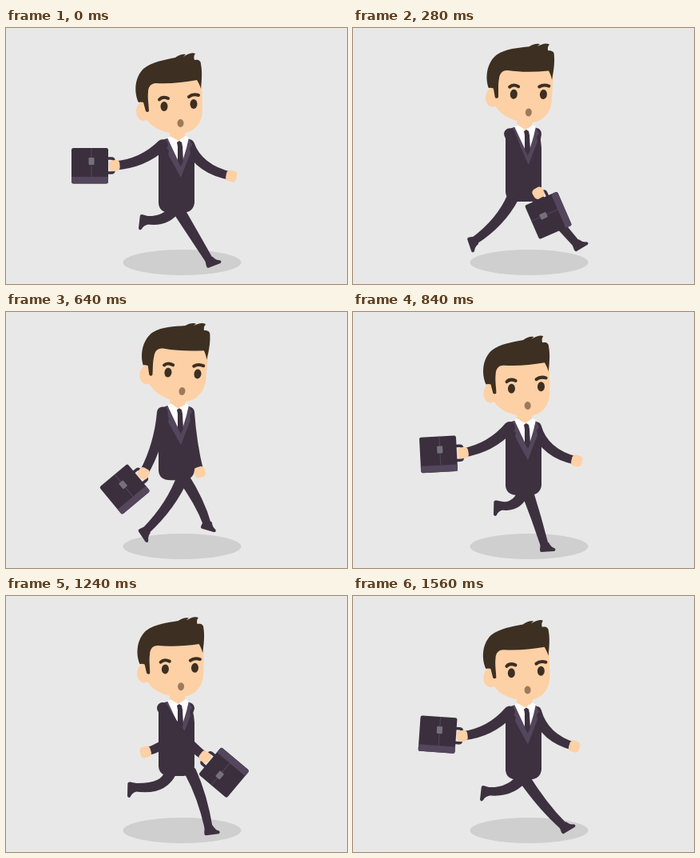
Recreate the animation shown at these times as an HTML page. Size 427 by 320 pixels, loop 1.6 s.

```html
<!DOCTYPE html>
<html lang="en">
<head>
<meta charset="utf-8">
<title>Running businessman</title>
<style>
  html, body { margin: 0; width: 100%; height: 100%; overflow: hidden; background: #e8e8e8; }
  svg { display: block; width: 100vw; height: 100vh; }
  .suit { fill: #3d3140; }
  .skin { fill: #fdd0a5; }
  .hair { fill: #3d2f22; }
  .trim { fill: #54465c; }
  .brow { fill: none; stroke: #3d2f22; stroke-width: 4; stroke-linecap: round; }
</style>
</head>
<body>
<svg viewBox="0 0 427 320">
  <ellipse cx="220.5" cy="293" rx="74" ry="16" fill="#cfcfcf"/>

  <path id="farArm" class="suit"/>
  <rect id="farHand" class="skin" x="-6.5" y="-7" width="13.5" height="14" rx="4.5"/>

  <path id="legB" class="suit"/>
  <path id="shoeB" class="suit" d="M-5-4L5-4Q8 2 12 3Q15 5 12 7L-4 8Q-6 8-6 5Z"/>
  <path id="legA" class="suit"/>
  <path id="shoeA" class="suit" d="M-5-4L5-4Q8 2 12 3Q15 5 12 7L-4 8Q-6 8-6 5Z"/>

  <g id="torso">
    <path class="suit" d="M203 138C196 139 191 143 191 150V219Q192 231 206 231H222Q235 230 236 218V164Q235 146 228 138Z"/>
    <path class="trim" d="M201 138L198 147L204 153L203 158L219 187L231 156L230 150L233 146L229 138Z"/>
    <path fill="#fff" d="M202 137L210 134H222L229 137L226 150L219 173L209 152Z"/>
    <path class="suit" d="M214 143L217 141L220 143L221 148L222 166L219 174L215 166L215 148Z"/>
  </g>

  <g id="head">
    <path class="skin" d="M205 126H225L224 135L216 141L205 135Z"/>
    <ellipse class="skin" cx="172" cy="104" rx="9" ry="12"/>
    <path class="skin" d="M176 68L245 64L246 102C246 122 232 133 214 132C196 131 180 124 174 110Z"/>
    <path class="hair" d="M166 93C160 80 161 62 172 51C183 42 198 40 212 37C216 34 221 32 225 33L222 36C227 33 232 30 237 32C235 35 235 37 236 40C241 39 244 41 244 45C246 55 245 66 244 76C243 72 241 68 239 65C222 68 205 70 188 69C181 69 178 74 178 80C177 88 179 97 179 104Q177 106 175 104L172 93Q169 92 166 93Z"/>
    <path class="brow" d="M192 89.5Q196 85 203 88M229 86Q234 82 241 84"/>
    <ellipse class="hair" cx="198" cy="98" rx="4.5" ry="6"/>
    <ellipse class="hair" cx="235" cy="95" rx="4.5" ry="6"/>
    <ellipse cx="218.5" cy="119" rx="4" ry="5" fill="#9c7a5c"/>
  </g>

  <path id="nearArm" class="suit"/>
  <g id="bag">
    <path d="M-9 9V4Q-9 1-6 1H6Q9 1 9 4V9" fill="none" stroke="#3d3140" stroke-width="3.5"/>
    <rect x="-22" y="8" width="44.5" height="46" rx="2.5" fill="#3b2f3d"/>
    <path class="trim" d="M14 8H20Q22.500 8 22.500 10.500V51.500Q22.500 54 20 54H14Z"/>
    <path d="M-22 29H14" stroke="#54465c"/>
    <rect x="-10" y="25.500" width="9" height="7" rx="1" fill="#76707c"/>
  </g>
  <rect id="nearHand" class="skin" x="-6.5" y="-7" width="13.5" height="14" rx="4.5"/>
</svg>
<script>
const CYCLE = 800, STEP = 40;

// time, lift, near hand x y, bag angle, far hand x y, far elbow x y
const BODY = [
  [0, 0, 136, 172, 90, 282, 185, 242, 177],
  [40, 2, 138, 176, 87, 280, 186, 240, 177],
  [160, 22.5, 174, 204, 39.5, 254, 196, 226, 190],
  [280, 14, 232, 206, -23.5, 208, 198, 222, 185],
  [380, 1, 258, 197, -53, 168, 192, 212, 188],
  [440, 6, 249, 201, -50, 175, 195, 214, 185],
  [600, 23.5, 186, 207, 32.6, 230, 202, 230, 165],
  [760, 1.5, 137, 175, 94, 277, 188, 240, 178]
];

// time, hip x, knee x y, ankle x y, shoe angle
const LEG_A = [
  [0, 215, 236, 260, 255, 291, -18],
  [40, 218, 230, 258, 240, 292, 0],
  [160, 208, 216, 245, 201, 280, 35],
  [280, 200, 185, 243, 152, 266, 75],
  [440, 206, 198, 243, 160, 239, 95],
  [600, 222, 236, 236, 219, 260, 65],
  [680, 218, 246, 242, 280, 270, -27],
  [760, 212, 238, 264, 264, 288, -27]
];
const LEG_B = [
  [0, 211, 200, 243, 175, 240, 100],
  [40, 214, 205, 246, 184, 242, 95],
  [160, 231, 252, 225, 224, 254, 80],
  [280, 230, 252, 238, 280, 270, -27],
  [440, 231, 246, 250, 254, 291, -3],
  [600, 225, 226, 242, 199, 279, 45],
  [680, 218, 190, 243, 155, 266, 75],
  [760, 214, 198, 247, 168, 244, 100]
];

const $ = id => document.getElementById(id);
const move = (id, x, y, a = 0) => $(id).setAttribute('transform', `translate(${x} ${y}) rotate(${a})`);
const heading = (a, b) => Math.atan2(b[1] - a[1], b[0] - a[0]) * 180 / Math.PI;

// Smooth periodic interpolation through key rows.
function sample(keys, t) {
  const n = keys.length;
  const row = i => {
    const turn = Math.floor(i / n), k = keys[i - turn * n];
    return [k[0] + turn * CYCLE, ...k.slice(1)];
  };
  let i = n - 1;
  while (keys[i][0] > t) i--;
  const [a, b, c, d] = [-1, 0, 1, 2].map(j => row(i + j));
  const h = c[0] - b[0], s = (t - b[0]) / h, r = 1 - s;
  return b.slice(1).map((p, j) => {
    j++;
    const m0 = (c[j] - a[j]) / (c[0] - a[0]) * h;
    const m1 = (d[j] - b[j]) / (d[0] - b[0]) * h;
    return r * r * (1 + 2 * s) * p + s * r * r * m0 + s * s * (3 - 2 * s) * c[j] - s * s * r * m1;
  });
}

const normal = (a, b) => {
  const x = b[0] - a[0], y = b[1] - a[1], l = Math.hypot(x, y) || 1;
  return [-y / l, x / l];
};

// Tapered curve from p to q, bent towards c, rounded at the start.
function limb(id, p, c, q, w0, w1) {
  const r0 = w0 / 2, r1 = w1 / 2;
  const n0 = normal(p, c), n1 = normal(c, q), nm = normal(p, q);
  const o0 = n0.map(v => v * r0), o1 = n1.map(v => v * r1);
  const oc = nm.map((v, i) => v * (r0 + r1) - (o0[i] + o1[i]) / 2);
  const at = (pt, o, k) => pt.map((v, i) => (v + k * o[i]).toFixed(2)).join(' ');
  $(id).setAttribute('d',
    `M${at(p, o0, 1)}Q${at(c, oc, 1)} ${at(q, o1, 1)}` +
    `L${at(q, o1, -1)}Q${at(c, oc, -1)} ${at(p, o0, -1)}` +
    `A${r0} ${r0} 0 0 0 ${at(p, o0, 1)}Z`);
}

function drawLeg(name, keys, t, lift) {
  const [hip, kx, ky, ax, ay, tilt] = sample(keys, t);
  limb('leg' + name, [hip, 226 - lift], [kx, ky], [ax, ay], 15, 10);
  move('shoe' + name, ax, ay, tilt);
}

function draw(t) {
  const [lift, hx, hy, swing, fx, fy, ex, ey] = sample(BODY, t);
  move('torso', 0, -lift);
  $('head').setAttribute('transform', `translate(0 ${-lift}) rotate(${lift * 0.36} 214 135)`);

  drawLeg('A', LEG_A, t, lift);
  drawLeg('B', LEG_B, t, lift);

  const far = [fx, fy], elbow = [ex, ey];
  limb('farArm', [229, 146 - lift], elbow, far, 14, 10);
  move('farHand', fx, fy, heading(elbow, far));

  const shoulder = [196, 146 - lift], hand = [hx, hy];
  const dx = hx - shoulder[0], dy = hy - shoulder[1], bow = 0.002 * swing;
  const bend = [shoulder[0] + dx / 2 + dy * bow, shoulder[1] + dy / 2 - dx * bow];
  limb('nearArm', shoulder, bend, hand, 14, 11);
  move('nearHand', hx, hy, heading(bend, hand));
  move('bag', hx, hy, swing);
}

const start = performance.now();
function tick() {
  const t = Math.max(0, performance.now() - start) % CYCLE;
  draw(Math.floor(t / STEP) * STEP);
  requestAnimationFrame(tick);
}
tick();
</script>
</body>
</html>
```
